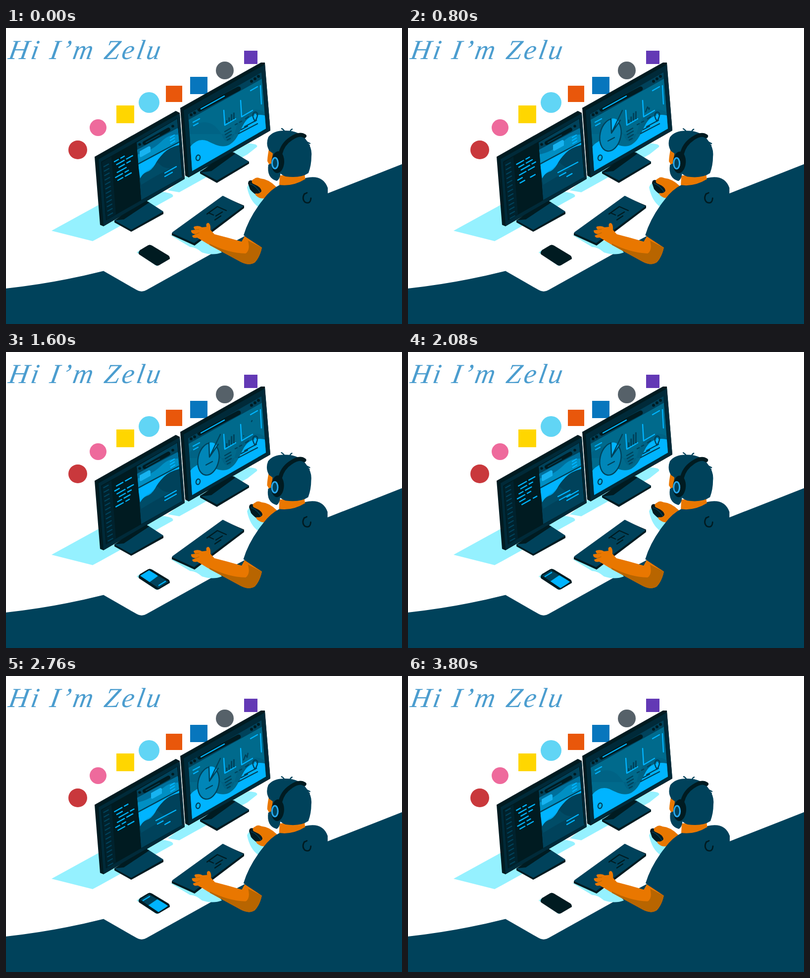
An HTML page for the animation above (3840 ms loop, 800x600 px).

```html
<!DOCTYPE html>
<html lang="en">
<head>
<meta charset="utf-8">
<title>Developer at a desk</title>
<style>
html, body { margin: 0; width: 100%; height: 100%; overflow: hidden; background: #fff; }
svg { display: block; width: 800px; height: 600px; }
.title { font: italic 56px "Liberation Serif", serif; letter-spacing: 4.5px; fill: #4b9dcf; }
.navy { fill: #00425b; } .ink { fill: #001b21; } .bezel { fill: #002a39; } .cyan { fill: #00b4ff; }
.teal { fill: #006a8c; } .glow { fill: #95f1ff; } .skin { fill: #e97700; } .shade { fill: #b86500; }
.line { fill: none; stroke-linecap: round; stroke-linejoin: round; stroke-width: 2.4; }
.s-ink { stroke: #001b21; } .s-navy { stroke: #00425b; } .s-cyan { stroke: #00b4ff; }
</style>
</head>
<body>
<svg viewBox="0 0 800 600">
  <defs>
    <clipPath id="code"><path d="M194 272L264 232L273 349L203 389Z"/></clipPath>
    <clipPath id="page"><path d="M264 232L346 184L356 302L273 349Z"/></clipPath>
    <clipPath id="dash"><path d="M368 175L516 90L525 204L376 290Z"/></clipPath>
    <clipPath id="glass"><path d="M271 453.500L289 442.500L328 466L308 478.500Z"/></clipPath>
  </defs>

  <text class="title" x="3" y="63" transform="translate(0 63) skewX(-10) translate(0 -63)">Hi I’m Zelu</text>
  <g id="badges"></g>

  <!-- desk and shadows -->
  <path class="navy" d="M0 528Q100 517 197 492.500L264 531Q274 537 284 531L420 455L480 423L640 339L800 276V600H0Z"/>
  <path class="glow" d="M92 411L190 357L300 330L322 333Q340 336 337 342L190 424L175 432Z"/>
  <path class="glow" d="M327 329L366 298L490 234Q510 235 507 241L488 256L350 333Z"/>
  <path class="glow" d="M331 419L362 428L420 434L436 455Q418 462 396 455Q382 443 372 444Z"/>
  <path class="glow" d="M264 455L272 449L310 478L305 483Z"/>
  <path class="glow" d="M487 323Q492 308 508 318L528 342Q516 346 512 364Q493 353 487 323Z"/>

  <!-- left monitor -->
  <path class="ink" d="M219 390L287 352L318 373V377L253 413L219 394Z"/>
  <path class="navy" d="M219 390L287 352L318 372L253 409Z"/>
  <path class="ink" d="M235 379L284 350L289 354L238 388L219 390Z"/>
  <path class="ink" d="M179 261L343 168L351 172L361 306L197 402L190 399Z"/>
  <path class="bezel" d="M187 266L351 173L361 305L197 401Z"/>
  <path class="ink" d="M192 271L347 183L357 301L202 390Z"/>
  <path fill="#00222d" d="M194 272L213 261L222 378L203 389Z"/>
  <g clip-path="url(#code)">
    <g id="gutter" class="line s-navy"></g>
    <g id="rows" class="line s-cyan"></g>
  </g>
  <g clip-path="url(#page)">
    <path class="navy" d="M264 232L346 184L356 302L273 349Z"/>
    <path fill="#008fc3" d="M265 247L347 203L350 231L267 275Z"/>
    <path fill="#006f9b" d="M265 247L347 203L349 216Q328 215 313 231Q290 252 266 256Z"/>
    <path class="cyan" d="M267 277L350 232V237Q330 242 319 253Q307 265 301 277Q294 289 284 292Q276 295 271 305Z"/>
    <path class="teal" d="M271 306Q278 291 291 286L306 272Q318 286 332 284L298 303L273 318Z" opacity=".25"/>
    <path class="line s-navy" d="M266 276L350 231"/>
    <path id="card" fill="#17b3f0" d="M270 250L288 240Q291 239 292 242V251L274 261Q270 263 270 259Z"/>
    <path class="line s-cyan" stroke-width="2" d="M332 222L340 217M332 228L340 223M333 234L341 229"/>
    <path class="line s-ink" style="stroke-width:8" d="M280 233L328 206"/>
    <path class="line s-navy" style="stroke-width:2" d="M283 232L310 217"/>
    <g class="ink"><circle cx="270" cy="236" r="2.8"/><circle cx="337" cy="199" r="2.8"/></g>
    <g id="copy" class="line s-cyan"></g>
  </g>

  <!-- right monitor -->
  <path class="ink" d="M392 291L460 252L491 271V275L426 314L392 295Z"/>
  <path class="navy" d="M392 291L460 252L491 271L426 309Z"/>
  <path class="ink" d="M410 279L455 250L463 255L415 290L392 293Z"/>
  <path class="ink" d="M352 162L515 70L523 70L534 208L369 303L362 299Z"/>
  <path class="bezel" d="M359 167L523 74L534 207L369 301Z"/>
  <g clip-path="url(#dash)">
    <path class="navy" d="M366 175L517 88L518 104L368 190Z"/>
    <path class="teal" d="M369 186L517 103L526 204L376 292Z"/>
    <path fill="#00577a" d="M368 205Q398 181 421 198C443 217 435 231 450 230C467 225 459 190 484 174Q506 157 526 174V215H370Z" opacity=".4"/>
    <path class="cyan" d="M372 241Q387 222 407 229C430 241 447 247 464 225C478 205 479 185 499 178Q513 174 526 178V215L376 294Z"/>
    <path class="line s-ink" style="stroke-width:9" d="M391 165L470 123"/>
    <path class="line s-cyan" d="M394 164L441 138"/>
    <g class="ink"><circle cx="374" cy="176" r="3"/><circle cx="381" cy="172" r="3"/><circle cx="496" cy="108" r="3"/><circle cx="503" cy="103" r="3"/><circle cx="510" cy="98" r="3"/></g>
    <path class="line s-cyan" d="M378 191L391 184M379 198L388 193M494 127L508 119M514 117L516 154M440 167L442 197L464 184M474 147L476 180L498 167"/>
    <path class="line s-navy" d="M442 210L454 203M443 216L455 209M445 222L455 216M447 227L453 224M463 196L467 194M472 191L476 189M484 184L490 180M482 200L506 187M470 214L508 194M475 206L488 199"/>
    <ellipse class="line s-navy" cx="388" cy="263" rx="4" ry="5.5" transform="rotate(15 388 263)"/>
    <path class="line s-navy" d="M503 189Q497 179 499 174Q503 167 508 173Q509 180 503 189Z"/>
    <circle class="cyan" cx="503.500" cy="176" r="2"/>
    <g id="pie">
      <ellipse cx="409" cy="217" rx="21" ry="33" transform="rotate(12 409 217)" fill="#0086b8" stroke="#00425b" stroke-width="2.400"/>
      <path class="cyan" d="M411 213L410 184Q420 181 426 190Z"/>
      <path class="line s-navy" d="M411 213L410 184M411 213L433 167M411 213L429 187M404 229L417 222"/>
    </g>
    <g id="bars" class="line s-navy" style="stroke-width:3;stroke-linecap:butt"></g>
    <path id="trend" class="line s-navy" pathLength="100" d="M480 170L484 160L487 165L491 146L493 147L497 139"/>
  </g>

  <!-- keyboard and phone -->
  <path class="ink" d="M335 416L437 341L481 360V365L381 441L335 420Z"/>
  <path class="navy" d="M336 414Q335 416 338 417L380 436L480 361L438 340Z"/>
  <path class="line s-ink" d="M406 377L427 362L445 370M424 381L437 373M422 389L434 381M410 375L419 379"/>
  <path class="ink" d="M271 450L286 441Q290 438 295 441L328 461Q331 463 331 468L309 481Q305 483 301 480L269 459Q266 455 271 450Z"/>
  <g id="screen" clip-path="url(#glass)">
    <path class="navy" d="M268 454L289 440L331 466L308 481Z"/>
    <g id="feed">
      <path class="cyan" d="M266 454L288 439L307 454L288 468Z"/>
      <path class="line s-cyan" d="M309 473L322 465M257 443L270 435"/>
    </g>
  </g>

  <!-- mouse hand -->
  <g id="mouse">
    <path class="ink" d="M489 315Q490 306 499 310L514 320Q523 329 518 342Q503 340 493 327Z"/>
    <path class="line s-navy" style="stroke-width:1.500" d="M493 316Q504 319 513 333"/>
    <path class="skin" d="M498 315Q494 309 501 306Q506 301 514 305Q530 306 546 322L526 344Q516 348 508 342Q502 338 504 335Q512 337 516 331Q516 325 508 320Z"/>
  </g>

  <!-- person -->
  <g id="body">
    <path class="navy" d="M517 445L480 420Q491 383 520 347Q535 327 553 318L605 304Q640 296 650 324V340L680 460L520 480Z"/>
    <path class="line s-ink" style="stroke-width:2.800" d="M603 336Q597 346 604 353Q615 358 616 345M604 336L608 334"/>
  </g>
  <g id="head">
    <path class="skin" d="M553 299L604 294Q603 302 605 306Q579 322 552 318Z"/>
    <path class="skin" d="M531 246Q528 262 528 270L533 279H542V246Z"/>
    <path class="navy" d="M530 277Q526 304 547 310Q555 306 555 286L537 274Z"/>
    <path class="navy" d="M532 249Q524 236 530 221Q540 208 562 208Q594 207 608 229Q619 244 617 260Q617 278 611 294Q595 305 565 301Q553 297 548 286L537 276L539 254Z"/>
    <path class="line s-navy" d="M564 211Q560 205 557 204M574 211Q574 207 578 205M608 231L614 234M609 234L613 238"/>
    <path class="line s-ink" style="stroke-width:8" d="M553 262Q556 237 576 224Q593 212 603 219"/>
    <ellipse class="ink" cx="549" cy="272" rx="13" ry="22" transform="rotate(4 549 272)"/>
    <ellipse class="navy" cx="543.500" cy="274" rx="6" ry="11" stroke="#28a9ee" stroke-width="3"/>
  </g>
  <g id="arm">
    <path class="skin" d="M386 425Q377 427 376 421L383 418Q373 417 374 410L382 409Q376 403 382 402Q390 400 396 404L405 403Q403 395 409 395Q414 398 413 409L421 418Q449 425 476 433L482 422L517 445Q513 464 503 475Q491 483 474 474L408 438Q395 430 386 425Z"/>
    <path class="shade" d="M411 437Q448 456 484 457Q494 451 489 431L517 445Q513 464 503 475Q491 483 474 474L411 440Z"/>
    <path class="line" stroke="#b86500" style="stroke-width:1.200" d="M383 418L390 415M382 409L390 408"/>
  </g>
</svg>
<script>
const LOOP = 3840, HALF = LOOP / 2, STEP = 40;
const $ = id => document.getElementById(id);

function add(parent, tag, attrs) {
  const el = document.createElementNS("http://www.w3.org/2000/svg", tag);
  for (const key in attrs) el.setAttribute(key, attrs[key]);
  return parent.appendChild(el);
}

const move = (el, x, y) => el.setAttribute("transform", `translate(${x} ${y})`);

// Eased value from [time, value] pairs.
function track(keys, t) {
  let i = 1;
  while (i < keys.length - 1 && t > keys[i][0]) i++;
  const [t0, a] = keys[i - 1], [t1, b] = keys[i];
  const p = Math.min(1, Math.max(0, (t - t0) / (t1 - t0)));
  return a + (b - a) * p * p * (3 - 2 * p);
}

// Plain icon placeholders.
const disc = (x, y, r, fill) => add($("badges"), "circle", { cx: x, cy: y, r, fill });
const tile = (x, y, size, fill) => add($("badges"), "rect", { x, y, width: size, height: size, fill });
disc(145, 247, 19, "#c9383c");
disc(186, 202, 17, "#ee6a9c");
tile(223, 157, 36, "#ffd600");
disc(289, 151, 21, "#61d5f5");
tile(323, 117, 33, "#e9570b");
tile(372, 99, 35, "#0776bd");
disc(442, 86, 18, "#566169");
tile(481, 46, 27, "#6339b5");

for (let i = 0; i < 15; i++) {
  const x = 198 + i * 0.75, y = 281 + i * 9;
  add($("gutter"), "path", { d: `M${x} ${y}l9 -5` });
}

const ROWS = 16, GAP = 8, VISIBLE = 6;
const rows = Array.from({ length: ROWS }, (_, i) => {
  const indent = [0, 4, 8, 4][i % 4], first = 8 + (i * 7) % 11, second = 7 + (i * 5) % 10;
  const mid = indent + first + 5;
  const slant = (x, w) => `M${x} ${-x * 0.56}l${w} ${-w * 0.56}`;
  const tail = i % 5 === 3 ? "" : slant(mid, Math.min(second, 40 - mid));
  return add($("rows"), "path", { d: slant(indent, first) + tail, pathLength: 100 });
});

const copy = ["M303 293L343 272", "M306 300L330 287", "M321 294L344 281", "M321 301L344 288"]
  .map(d => add($("copy"), "path", { d, pathLength: 100 }));
const bars = [0, 1, 2, 3].map(() => add($("bars"), "path", {}));

function trim(el, from, to) {
  const visible = to - from > 0.5;
  el.style.visibility = visible ? "visible" : "hidden";
  el.setAttribute("stroke-dasharray", `0 ${from} ${to - from} 200`);
}

function drawCode(t) {
  const scroll = t / LOOP * ROWS;
  rows.forEach((row, i) => {
    const pos = (i - scroll + ROWS) % ROWS;
    const typed = Math.min(1, Math.max(0, VISIBLE - pos));
    move(row, 219 + pos * 0.6, 271 + pos * GAP);
    trim(row, 0, typed * 100);
  });
  const shift = (t / 240) % 1;
  move($("gutter"), -shift * 0.75, -shift * 9);
}

function drawPage(p) {
  const x = track([[260, 0], [650, 23], [1050, 23], [1400, 0]], p);
  move($("card"), x, -x * 0.55);
  trim(copy[0], 0, track([[0, 0], [160, 60], [780, 100], [1200, 100], [1480, 0]], p));
  trim(copy[1], 0, track([[0, 0], [160, 90], [650, 65], [1200, 0]], p));
  trim(copy[2], 0, track([[0, 100], [350, 100], [700, 0], [1300, 0], [1480, 100]], p));
  trim(copy[3], 0, track([[0, 65], [160, 100], [800, 45], [1480, 65], [1600, 100], [1880, 65]], p));
}

function drawCharts(t, p) {
  const pie = track([[40, 0], [600, 1], [3150, 1], [3640, 0]], t);
  $("pie").setAttribute("transform", `translate(410 217) scale(${pie}) translate(-410 -217)`);
  const size = track([[0, 0.75], [180, 1.25], [420, 1.3], [800, 0.9], [1480, 0.75], [1600, 1], [1880, 0.75]], p);
  bars.forEach((bar, i) => {
    const height = [8, 12, 17, 18][i] * size;
    bar.setAttribute("d", `M${446 + i * 4.8} ${193 - i * 2.7}v${-height}`);
  });
  trim($("trend"), track([[1200, 0], [1660, 100]], p), track([[580, 0], [1080, 100]], p));
}

function drawPhone(t) {
  $("screen").setAttribute("opacity", track([[1200, 0], [1320, 1], [3520, 1], [3640, 0]], t));
  const slide = track([[1640, 0], [2040, 1]], t);
  move($("feed"), slide * 20, slide * 12);
}

function drawPerson(t) {
  const sway = (1 - Math.cos(t / 1280 * 2 * Math.PI)) / 2;
  move($("head"), -sway, sway * 0.4);
  move($("body"), -sway * 0.8, 0);
  const reach = track([[0, 0], [800, 4], [1100, 4], [1600, 2], [2800, 2], [3400, 0]], t);
  move($("mouse"), reach, -reach * 0.2);
  const tap = track([[240, 0], [360, 1], [440, 1], [480, 0]], t % 480);
  $("arm").setAttribute("transform", `translate(500 450) rotate(${tap * 0.25}) scale(${1 - tap * 0.012}) translate(-500 -450)`);
}

function draw(now) {
  const t = Math.floor(now % LOOP / STEP) * STEP, p = t % HALF;
  drawCode(t);
  drawPage(p);
  drawCharts(t, p);
  drawPhone(t);
  drawPerson(t);
}

const start = performance.now();
function tick() {
  draw(performance.now() - start);
  requestAnimationFrame(tick);
}
tick();
</script>
</body>
</html>
```
